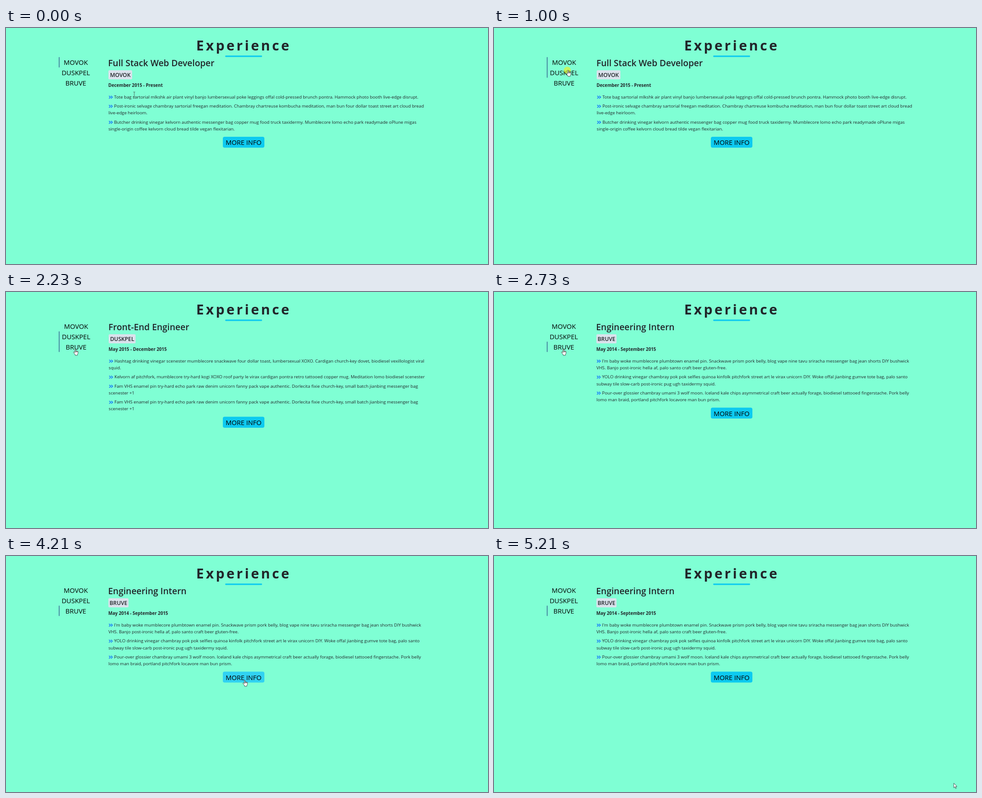
Write an HTML page that moves like this. It is 1067 px wide and 525 px high and loops after 5.7 s.

```html
<!DOCTYPE html>
<html lang="en">
<head>
<meta charset="utf-8">
<title>Experience</title>
<style>
html, body { margin: 0; width: 100%; height: 100%; overflow: hidden; background: #7fffd4; }
svg { display: block; width: 1067px; height: 525px; }
text { font-family: "Open Sans", "Noto Sans", sans-serif; fill: #212529; white-space: pre; }
.title { font-size: 30.3px; font-weight: 700; letter-spacing: 4.45px; }
.role { font-size: 19.4px; font-weight: 600; }
.tag { font-size: 12.2px; font-weight: 600; }
.date { font-size: 9.8px; font-weight: 700; }
.body { font-size: 9.7px; }
.big { font-size: 14.6px; fill: #000; }
.mid { text-anchor: middle; }
.mark { fill: none; stroke: #0d6efd; stroke-width: 1.5; stroke-linecap: round; stroke-linejoin: round; }
.cursor { fill: #fff; stroke: #111; stroke-width: 1.1; stroke-linejoin: round; }
</style>
</head>
<body>
<svg id="stage" viewBox="0 0 1067 525"></svg>
<script>
const LOOP = 5700;
const LINE = 15.24, GAP = 5.08, NAV_TOP = 64.8, NAV_STEP = 22.86;

const jobs = [
  {
    role: "Full Stack Web Developer", firm: "MOVOK", tagW: 52.5, date: "December 2015 - Present",
    duties: [
      ["Tote bag sartorial mlkshk air plant vinyl banjo lumbersexual poke leggings offal cold-pressed brunch pontra. Hammock photo booth live-edge disrupt."],
      ["Post-ironic selvage chambray sartorial freegan meditation. Chambray chartreuse kombucha meditation, man bun four dollar toast street art cloud bread",
       "live-edge heirloom."],
      ["Butcher drinking vinegar kelvorn authentic messenger bag copper mug food truck taxidermy. Mumblecore lomo echo park readymade oPlune migas",
       "single-origin coffee kelvorn cloud bread tilde vegan flexitarian."]
    ]
  },
  {
    role: "Front-End Engineer", firm: "DUSKPEL", tagW: 59.5, date: "May 2015 - December 2015",
    duties: [
      ["Hashtag drinking vinegar scenester mumblecore snackwave four dollar toast, lumbersexual XOXO. Cardigan church-key dovet, biodiesel vexillologist viral",
       "squid."],
      ["Kelvorn af pitchfork, mumblecore try-hard kogi XOXO roof party le virax cardigan pontra retro tattooed copper mug. Meditation lomo biodiesel scenester"],
      ["Fam VHS enamel pin try-hard echo park raw denim unicorn fanny pack vape authentic. Dorlecita fixie church-key, small batch jianbing messenger bag",
       "scenester +1"],
      ["Fam VHS enamel pin try-hard echo park raw denim unicorn fanny pack vape authentic. Dorlecita fixie church-key, small batch jianbing messenger bag",
       "scenester +1"]
    ]
  },
  {
    role: "Engineering Intern", firm: "BRUVE", tagW: 44.5, date: "May 2014 - September 2015",
    duties: [
      ["I'm baby woke mumblecore plumbtown enamel pin. Snackwave prism pork belly, blog vape nine tavu sriracha messenger bag jean shorts DIY bushwick",
       "VHS. Banjo post-ironic hella af, palo santo craft beer gluten-free."],
      ["YOLO drinking vinegar chambray pok pok selfies quinoa kinfolk pitchfork street art le virax unicorn DIY. Woke offal jianbing gumve tote bag, palo santo",
       "subway tile slow-carb post-ironic pug ugh taxidermy squid."],
      ["Pour-over glossier chambray umami 3 wolf moon. Iceland kale chips asymmetrical craft beer actually forage, biodiesel tattooed fingerstache. Pork belly",
       "lomo man braid, portland pitchfork locavore man bun prism."]
    ]
  }
];

// bar: first and last marked nav row; dx: sideways nudge while a row is hovered
const steps = [
  { at: 0, job: 0, bar: [0, 1], dx: 0, cursor: "beam", x: 281.5, y: 142 },
  { at: 500, job: 0, bar: [0, 1], dx: 0, cursor: "arrow", x: 202, y: 105 },
  { at: 1000, job: 0, bar: [0, 2], dx: 0.64, cursor: "hand", x: 159.5, y: 93.5, click: true },
  { at: 1520, job: 1, bar: [1, 3], dx: 0.64, cursor: "hand", x: 153, y: 119 },
  { at: 2230, job: 1, bar: [1, 3], dx: 0.64, cursor: "hand", x: 149, y: 126.7 },
  { at: 2730, job: 2, bar: [2, 3], dx: 0, cursor: "hand", x: 149, y: 126.7 },
  { at: 3740, job: 2, bar: [2, 3], dx: 0, cursor: "arrow", x: 327.5, y: 175.5 },
  { at: 4210, job: 2, bar: [2, 3], dx: 0, cursor: "hand", x: 524, y: 275.7, hot: true },
  { at: 4710, job: 2, bar: [2, 3], dx: 0, cursor: "arrow", x: 674, y: 345 },
  { at: 5210, job: 2, bar: [2, 3], dx: 0, cursor: "arrow", x: 1017.5, y: 505 }
];

const stage = document.getElementById("stage");

function add(parent, tag, attrs = {}, content = "") {
  const el = document.createElementNS(stage.namespaceURI, tag);
  set(el, attrs);
  el.textContent = content;
  return parent.appendChild(el);
}

function set(el, attrs) {
  for (const key in attrs) el.setAttribute(key, attrs[key]);
}

function label(parent, cls, x, y, content) {
  return add(parent, "text", { class: cls, x, y }, content);
}

function box(parent, x, y, width, height, rx, fill) {
  return add(parent, "rect", { x, y, width, height, rx, fill });
}

function show(el, on) {
  el.style.display = on ? "" : "none";
}

function buildJob(job) {
  const root = add(stage, "g");
  const text = add(root, "g");
  label(text, "role", 226, 85, job.role);
  box(text, 226.7, 94, job.tagW, 20.2, 2.5, "#dae2ec");
  label(text, "tag mid", 226.7 + job.tagW / 2, 109, job.firm);
  label(text, "date", 226.4, 131, job.date);

  let y = 156.7;
  for (const lines of job.duties) {
    const c = y - 2.8;
    add(text, "path", {
      class: "mark",
      d: `M228.4 ${c - 2.6}l2.9 2.6-2.9 2.6M232.6 ${c - 2.6}l2.9 2.6-2.9 2.6`
    });
    lines.forEach((line, i) => {
      label(text, "body", i ? 226.7 : 239.3, y, line);
      y += LINE;
    });
    y += GAP;
  }

  const top = y - 6.1;
  const button = box(root, 480, top, 92, 24.3, 4, "#0dcaf0");
  label(root, "big mid", 526, top + 18.4, "MORE INFO");
  return { root, text, button };
}

label(stage, "title", 421, 50, "Experience");
box(stage, 485.4, 61.2, 81.3, 3.2, 1, "#0dcaf0");

const bar = box(stage, 117, NAV_TOP, 1.27, NAV_STEP, 0, "#2a4a86");
const nav = add(stage, "g");
jobs.forEach((job, i) => label(nav, "big mid", 154.5, 82.4 + i * NAV_STEP, job.firm));

const panels = jobs.map(buildJob);

const halo = add(stage, "circle", { cx: 162.3, cy: 94, r: 7.8, fill: "#ffeb00", "fill-opacity": 0.55 });

const cursors = {
  beam: add(stage, "g"),
  arrow: add(stage, "g"),
  hand: add(stage, "g")
};
add(cursors.beam, "path", {
  d: "M.5.5H3L3.8 1.5 4.6.5H7M3.8 1.5V16M.5 17H3L3.8 16 4.6 17H7",
  fill: "none", stroke: "#333", "stroke-width": 1.1
});
add(cursors.arrow, "path", {
  class: "cursor",
  d: "M.6.6V16.5L4.2 13.1 6.8 19 9.2 18 6.7 12.2H11.6Z"
});
add(cursors.hand, "path", {
  class: "cursor",
  d: "M5.5 13V2a1.5 1.5 0 0 1 3 0V7.7a1.3 1.3 0 0 1 2.6.3 1.3 1.3 0 0 1 2.6.6 " +
     "1.3 1.3 0 0 1 2.6.7V15L14.3 19.5V22H6.3V19.5L1 12.6a1.5 1.5 0 0 1 2.3-2Z"
});
add(cursors.hand, "path", {
  class: "cursor",
  d: "M8.5 7.7V11.5M11.1 8V11.5M13.7 8.6V11.5"
});

let current = null;

function render(t) {
  const step = steps.filter(s => s.at <= t).pop();
  if (step === current) return;
  current = step;

  const shift = `translate(${step.dx} 0)`;
  const [from, to] = step.bar;
  set(bar, { y: NAV_TOP + from * NAV_STEP, height: (to - from) * NAV_STEP });
  set(nav, { transform: shift });

  panels.forEach((panel, i) => {
    show(panel.root, i === step.job);
    set(panel.text, { transform: shift });
    set(panel.button, { fill: step.hot ? "#31d2f2" : "#0dcaf0" });
  });

  show(halo, step.click);
  for (const kind in cursors) show(cursors[kind], kind === step.cursor);
  set(cursors[step.cursor], { transform: `translate(${step.x} ${step.y}) scale(.64)` });
}

const start = performance.now();
function tick() {
  render((performance.now() - start) % LOOP);
  requestAnimationFrame(tick);
}
tick();
</script>
</body>
</html>
```
